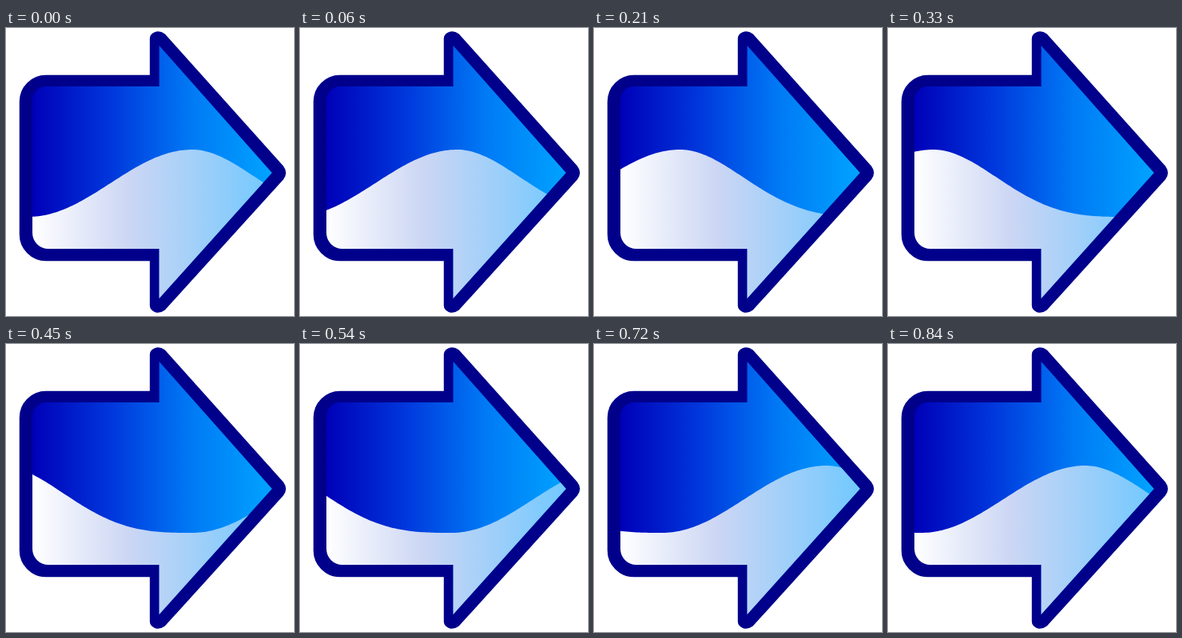
Recreate the animation shown at these times as an HTML page. Size 360 px wide and 360 px high, loop 0.87 s.

```html
<!DOCTYPE html>
<html lang="en">
<head>
<meta charset="utf-8">
<style>
html, body { margin: 0; width: 100%; height: 100%; overflow: hidden; background: #fff; }
svg { display: block; width: 100vw; height: 100vh; }
</style>
</head>
<body>
<svg viewBox="0 0 360 360">
  <defs>
    <linearGradient id="sky" gradientUnits="userSpaceOnUse" x1="33" x2="335">
      <stop offset="0" stop-color="#0000b8"/>
      <stop offset=".33" stop-color="#0038dc"/>
      <stop offset=".66" stop-color="#007af5"/>
      <stop offset="1" stop-color="#00a4ff"/>
    </linearGradient>
    <linearGradient id="water" gradientUnits="userSpaceOnUse" x1="33" x2="335">
      <stop offset="0" stop-color="#fff"/>
      <stop offset=".4" stop-color="#ccd6f4"/>
      <stop offset="1" stop-color="#70c8ff"/>
    </linearGradient>
    <path id="inner" d="M191.5 73V22L332.5 181L191.5 338V276H53A20 20 0 0 1 33 256V90A17 17 0 0 1 50 73Z"/>
    <clipPath id="inside"><use href="#inner"/></clipPath>
  </defs>
  <path fill="#00008b" stroke="#00008b" stroke-width="14.5" stroke-linejoin="round"
    d="M187 66V13Q190 10 194 13L341 177Q344 181 341 185L194 347Q190 350 187 347V284H50A26 26 0 0 1 24 258V92A26 26 0 0 1 50 66Z"/>
  <use href="#inner" fill="url(#sky)"/>
  <path id="wave" fill="url(#water)" clip-path="url(#inside)"/>
</svg>
<script>
const LOOP = 870, TAU = 2 * Math.PI;
const RISE = 205, FALL = 240, LENGTH = RISE + FALL;
const wave = document.getElementById('wave');

// Height at a distance right of a trough: a cosine with a longer, flatter slope on its left.
function profile(distance) {
  const u = ((distance + FALL) % LENGTH + LENGTH) % LENGTH - FALL;
  const phase = u > 0 ? u / RISE : (-u / FALL) ** 1.475;
  return 194 + 42 * Math.cos(Math.PI * phase);
}

function draw(now) {
  const time = Math.floor(now % LOOP / 30) * 30;
  const turn = TAU * time / LOOP;
  const sway = 6 * Math.cos(2 * turn) + 5 * Math.cos(3 * turn);
  const trough = 462 - LENGTH * time / LOOP + sway;
  let d = 'M20 360';
  for (let x = 20; x <= 350; x += 3) d += `L${x} ${profile(x - trough).toFixed(2)}`;
  wave.setAttribute('d', d + 'V360Z');
  requestAnimationFrame(draw);
}
draw(performance.now());
</script>
</body>
</html>
```
